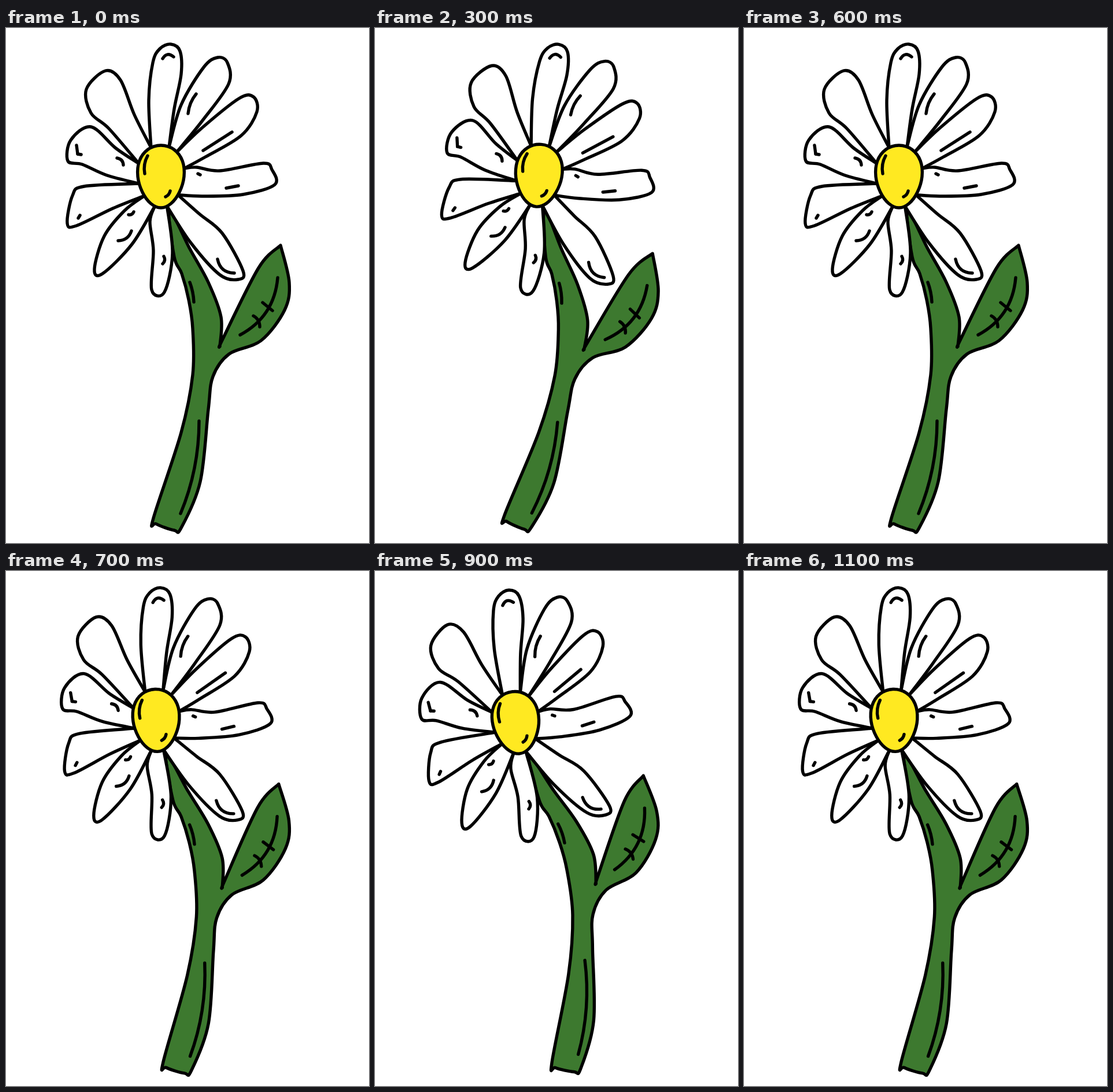
Write an HTML page with a canvas that moves like this. It is 628 px wide and 891 px high and loops after 1200 ms.

```html
<!DOCTYPE html>
<html lang="en">
<head>
<meta charset="utf-8">
<title>Swaying daisy</title>
<style>
html, body { margin: 0; width: 100%; height: 100%; overflow: hidden; background: #fff; }
canvas { display: block; }
</style>
</head>
<body>
<canvas id="stage" width="628" height="891"></canvas>
<script>
const W = 628, H = 891, STEP = 100, RAD = Math.PI / 180;
const WHITE = '#fff', GREEN = '#3d792f', YELLOW = '#ffe921';
const PIVOT = [298, 449];
const ctx = document.getElementById('stage').getContext('2d');

const points = text => text.trim().split(/\s+/).map(s => s.split(',').map(Number));

// Smooth curve through key points; a repeated point makes a corner.
function curve(p, closed) {
  const n = p.length, path = new Path2D();
  const at = i => closed ? p[(i + n) % n] : p[Math.max(0, Math.min(n - 1, i))];
  path.moveTo(...p[0]);
  for (let i = 0; i < (closed ? n : n - 1); i++) {
    const a = at(i - 1), b = at(i), c = at(i + 1), d = at(i + 2);
    if (b[0] === c[0] && b[1] === c[1]) continue;
    path.bezierCurveTo(
      b[0] + (c[0] - a[0]) / 6, b[1] + (c[1] - a[1]) / 6,
      c[0] - (d[0] - b[0]) / 6, c[1] - (d[1] - b[1]) / 6,
      ...c);
  }
  return path;
}

// Egg-shaped heart; the angle runs clockwise from the top.
function rim(deg) {
  const s = Math.sin(deg * RAD), c = Math.cos(deg * RAD);
  return [268 + 40 * s * (1 + 0.15 * c), 257 - 54 * c];
}
const heart = curve(Array.from({ length: 12 }, (_, i) => rim(i * 30)), true);

// Each petal leaves the rim at its angle and returns where the next one starts.
const petals = [
  [338, '247,125 254,60 266,36 285,28 301,40 303,80 291,140'],
  [18, '303,133 342,68 366,51 383,60 385,97 340,160'],
  [38, '340,172 403,122 428,119 434,145 407,186 345,223'],
  [75, '330,241 370,247 445,234 460,245 465,271 410,288 340,291'],
  [126, '335,322 374,355 410,420 402,435 370,427 320,372'],
  [162, '288,390 274,457 252,453 255,385 249,335'],
  [198, '218,374 167,425 153,417 170,360 205,316'],
  [232, '185,312 122,342 106,338 115,290 135,274'],
  [257, '175,255 132,236 107,230 112,194 147,171 190,208'],
  [295, '178,174 147,147 139,106 172,74 198,90 222,150']
].map(([from, keys], i, all) =>
  curve([rim(from), ...points(keys), rim(all[(i + 1) % all.length][0])]));

const stem = curve(points(`283,316 291,396 304,425 316,470 323,520 323,600 303,700
  255,848 260,858 291,869 303,865 336,785 350,660 358,603 386,564 441,541 482,488
  490,440 475,376 475,376 437,415 375,538 370,551 370,551 372,500 350,440 318,382`), true);

// Short stroke from a to b, bowed sideways by a share of its length.
function dash(ends, bow = 0) {
  const [[x, y], [u, v]] = points(ends), path = new Path2D();
  path.moveTo(x, y);
  path.quadraticCurveTo((x + u) / 2 + (v - y) * bow, (y + v) / 2 - (u - x) * bow, u, v);
  return path;
}

const marks = [
  // petals
  dash('271,53 290,50', 0.6),
  dash('329,114 315,148', -0.15),
  dash('341,212 391,180'),
  dash('332,252 336,254'),
  dash('381,277 402,273'),
  dash('366,400 395,424', -0.4),
  dash('273,395 271,408', 0.4),
  dash('212,323 221,318', -0.4),
  dash('194,368 217,351', -0.35),
  dash('125,329 128,324'),
  dash('122,203 124,218'),
  dash('124,218 130,219'),
  dash('192,225 203,237', 0.4),
  // heart
  dash('245,221 240,252', -0.18),
  dash('276,292 284,282', -0.25),
  // stem and leaf
  dash('318,440 325,474', 0.08),
  dash('334,680 302,840', 0.1),
  dash('470,432 405,531', 0.27),
  dash('444,475 461,489'),
  dash('428,498 439,517', 0.3)
];

function shape(path, fill) {
  ctx.fillStyle = fill;
  ctx.fill(path);
  ctx.stroke(path);
}

// Sway in degrees: right and back, then left and back, in twelve even steps.
function sway(step) {
  const reach = 1 - Math.abs(step % 6 - 3) / 3;
  return reach * (step < 6 ? 4.5 : -7.3);
}

function draw(ms) {
  const step = Math.floor(ms / STEP) % 12;
  ctx.setTransform(1, 0, 0, 1, 0, 0);
  ctx.fillStyle = WHITE;
  ctx.fillRect(0, 0, W, H);
  ctx.translate(PIVOT[0], PIVOT[1]);
  ctx.rotate(sway(step) * RAD);
  ctx.translate(-PIVOT[0], -PIVOT[1]);
  ctx.strokeStyle = '#000';
  ctx.lineWidth = 5.4;
  ctx.lineCap = ctx.lineJoin = 'round';
  shape(stem, GREEN);
  petals.forEach(p => shape(p, WHITE));
  shape(heart, YELLOW);
  marks.forEach(m => ctx.stroke(m));
}

let start;
function tick(now) {
  if (start === undefined) start = now;
  draw(now - start);
  requestAnimationFrame(tick);
}
draw(0);
requestAnimationFrame(tick);
</script>
</body>
</html>
```
